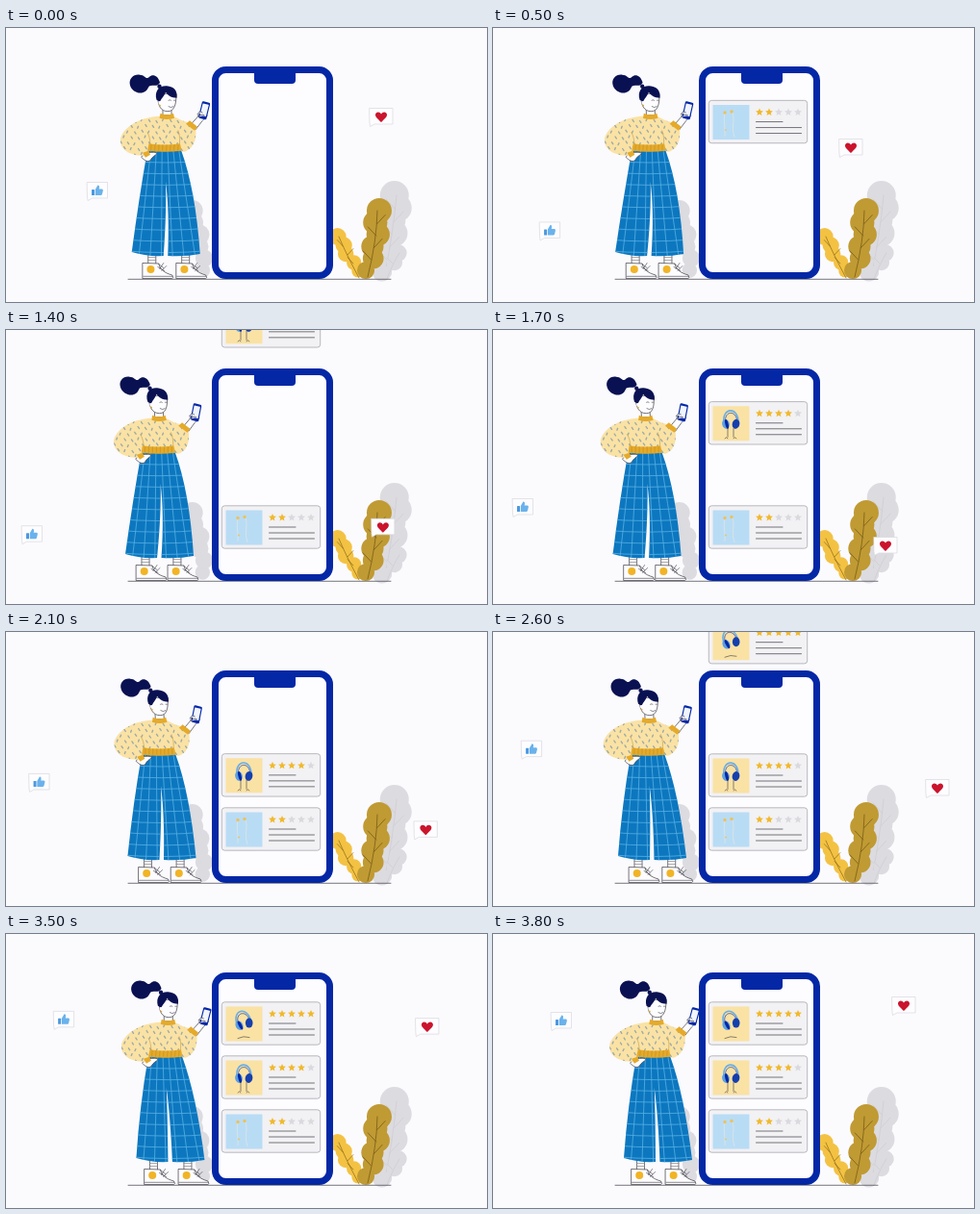
Recreate the animation shown at these times as an HTML page. Size 500 px wide and 285 px high, loop 3900 ms.

```html
<!DOCTYPE html>
<html lang="en">
<head>
<meta charset="utf-8">
<title>Product reviews</title>
<style>
html, body { margin: 0; width: 100%; height: 100%; overflow: hidden; background: #fbfafd; }
svg { display: block; width: 500px; height: 285px; }
</style>
</head>
<body>
<svg id="stage" viewBox="0 0 500 285" xmlns="http://www.w3.org/2000/svg"></svg>
<script>
const LOOP = 3900, STEP = 100;
const NAVY = '#0427a6', HAIR = '#0a1152', INK = '#3c3c44', GOLD = '#e5aa2a', CREAM = '#fae2a4';
const SKIN = '#fdfcff', GRAY = '#dcdbe0', BLUE = '#0c77bf';
const stage = document.getElementById('stage');

const path = (d, fill, stroke = 'none', w = 0.7) =>
  `<path d="${d}" fill="${fill}" stroke="${stroke}" stroke-width="${w}" stroke-linecap="round" stroke-linejoin="round"/>`;
const line = (d, color = INK, w = 0.7) => path(d, 'none', color, w);
const skin = d => path(d, SKIN, INK);
const dot = (x, y, r, fill) => `<circle cx="${x}" cy="${y}" r="${r}" fill="${fill}"/>`;
const rect = (x, y, w, h, r, fill, extra = '') =>
  `<rect x="${x}" y="${y}" width="${w}" height="${h}" rx="${r}" fill="${fill}" ${extra}/>`;
const group = (id, ...parts) => `<g id="${id}">${parts.join('')}</g>`;
const repeat = (n, f) => Array.from({ length: n }, (_, i) => f(i)).join('');
const mix = (a, b, k) => a + (b - a) * k;

// Lobes alternate along a bent stem from base to tip and widen upwards.
function leaf(x0, y0, x1, y1, bend, r, n, fill, vein) {
  const at = k => [mix(x0, x1, k) + bend * Math.sin(Math.PI * k), mix(y0, y1, k)];
  const side = i => (i % 2 ? 1 : -1);
  const lobes = repeat(n, i => {
    const k = i / (n - 1), [x, y] = at(k);
    return dot(x + side(i) * r * 0.15, y, r * (0.7 + 0.3 * Math.sqrt(k)), fill);
  });
  const [mx, my] = at(0.5);
  const stem = `M${x0} ${y0 + 7}Q${mx + bend * 0.5} ${my} ${x1} ${y1}`;
  const ribs = repeat(n - 2, i => {
    const [x, y] = at((i + 0.9) / (n - 1));
    return `M${x} ${y}l${side(i) * r * 0.65} ${-r * 0.7}`;
  });
  return lobes + line(stem + ribs, vein);
}

function star(cx, cy, fill) {
  const pts = repeat(10, i => {
    const r = i % 2 ? 1.9 : 4.1, a = i * Math.PI / 5 - Math.PI / 2;
    return `${(cx + r * Math.cos(a)).toFixed(2)},${(cy + r * Math.sin(a)).toFixed(2)} `;
  });
  return `<polygon points="${pts}" fill="${fill}"/>`;
}

const cup = (x, fill, turn) =>
  `<ellipse cx="${x}" cy="23.5" rx="3.8" ry="5" fill="${fill}" transform="rotate(${turn} ${x} 23.5)"/>`;
const headphones = (tilt, foot) =>
  `<g transform="rotate(${tilt} 23 22)">` + line('M16 22C14 6 31 5 31 22', '#69aee8', 1.6) +
  line('M17.5 20C17 10 28 9 29.5 19', NAVY, 0.6) + cup(18, '#5a9fe2', -14) + cup(28.5, '#153fae', 14) +
  cup(19, NAVY, -14).replace('3.8', '1.6') + '</g>' + line(foot, INK, 0.6);
const earbuds = line('M17 14C15 22 18 30 17 37M25 13C28 22 23 28 27 38', '#dfe6e2', 0.8) +
  dot(17, 13, 1.7, '#ecc25a') + dot(24, 12, 1.7, '#ecc25a') + dot(18, 31, 0.9, '#ecc25a');

const card = (stars, tint, art) => '<g class="card">' +
  rect(0.3, 0.3, 102.4, 44.4, 3, '#f2f1f4', 'stroke="#a9a9af" stroke-width="0.8"') +
  rect(4.5, 5, 38, 36, 0.5, tint) + art +
  repeat(5, i => star(53 + i * 10, 12.6, i < stars ? '#f0b92e' : '#dad9de')) +
  line('M49.5 22.5H77M49.5 28.5H96.5M49.5 34.5H96.5', '#66666c', 0.9) + '</g>';

const bubble = (id, w, icon) => group(id,
  path(`M${-w / 2} -8.5h${w}v16.5h${5 - w}l-4.5 2.5l-.5 -4Z`, '#fdfdff', '#d8d9de', 0.7), icon);
const thumb = rect(-6, -1, 3, 6, 0.5, '#4c98e0') +
  path('M-2.2 -1L0.4 -5.5Q2.4 -5.8 2 -3L1.7 -1.4H4.8Q6.2 -1.2 5.8 0.6L4.9 4.1Q4.6 5 3.5 5H-2.2Z', '#6ab2ec');
const heart = path('M0 6C-3 3 -6.2 0.6 -6 -2C-5.6 -5.2 -1.5 -5.5 0 -2.4C1.5 -5.5 5.6 -5.2 6 -2C6.2 0.6 3 3 0 6Z', '#cb142d');

const shoe = id => group(id,
  skin('M6 -18V1M14 -18V1'), line(repeat(4, i => `M6 ${-12 + i * 3}h8`), '#8a8a90'),
  skin('M0.5 0L17 0.5C18 6 22 10 31 12.5Q33 16 31 16H0.5Z'),
  line('M1 13.8H31M17 1L22 5M22 0L18 6M20 8L25 3M16 4L23 8', INK, 0.6), dot(8.7, 6.5, 4, '#f1b426'));

const blouse = 'M160 94C144 94 123 103 119 117C117.5 130 131 136 147 135L149 129H181L184 131C194 130 199 118 197 106L188 100C183 99 179 96 174 94Z';
const flecks = repeat(7, r => repeat(12, c =>
  `M${119 + c * 7.4 + (r % 2) * 3.7} ${97 + r * 5.8 + (c % 3) * 0.9}l${(r + c) % 3 ? 1.2 : -0.8} 1.9`));

const body = group('body',
  skin('M145 131C150 133 155 130 157 133C155 135 152 136 150 140C147 142 144 140 141 137Z'),
  skin('M190 105L199 95L201 90L208 88L209 94L204 99L197 108Z'),
  skin('M163 82V93H172V85Z'),
  `<clipPath id="topClip"><path d="${blouse}"/></clipPath>`, path(blouse, CREAM),
  `<g clip-path="url(#topClip)">${line(flecks, '#9eaaa8', 1.4)}</g>`,
  line('M150 127C150 119 149 114 147 111M180 126C181 119 181 114 179 109', '#c39b45', 0.6),
  path('M148.5 122.5Q165 125 181 122.5L182.5 130Q165 132 147 130Z', GOLD),
  line(repeat(8, i => `M${151 + i * 4} 124l-.3 5.5`), '#bb841a', 0.5),
  path('M160.5 91Q167 94 174 91L175 96Q167 98.5 159.5 96Z', GOLD),
  path('M187 102L191 98.5L199 105L196 109ZM142 132L148 130L150 134L145 137Z', GOLD),
  skin('M158 71C157 83 161 89 168 89C175 89 177 82 177 71Z'),
  path('M156.5 77C154 68 159 62 167 62.5C175 63 178.5 68 177.5 75C172 75 168 72 166 69C164 74 161 76 160 79Z', HAIR),
  line('M169 77.5Q170.5 76.5 171.5 77.5M174.5 77.5h1.5M169 84Q171.5 86 174 84', INK, 0.6),
  dot(160, 80, 1.6, SKIN), dot(160, 83, 0.9, GOLD),
  path('M160 59C158 51 152 50 149 53C145 57 145 51 139 51C133 50 127 55 129 62C131 69 140 72 145 68C149 65 147 62 152 62C155 62 158 63 160 59Z', HAIR),
  dot(159.5, 63, 2.2, HAIR),
  '<g transform="rotate(14 206 88)">', rect(201.8, 79, 8.6, 18, 1.4, NAVY), rect(202.9, 81.2, 6.4, 12.6, 0.4, '#f1f5fd'), '</g>',
  skin('M199 92Q201 88 204 90M200 95Q203 91 206 93'));

stage.innerHTML = rect(0, 0, 500, 285, 0, '#fbfafd') +
  leaf(206, 252, 192, 190, 2, 11, 6, GRAY, GRAY) +
  leaf(393, 253, 406, 174, 2, 15, 7, GRAY, '#cdccd2') +
  leaf(396, 254, 409, 234, 0, 9, 3, GRAY, '#cdccd2') +
  leaf(367, 253, 346, 217, -2, 9, 5, '#f3c243', '#8b691a') +
  leaf(376, 252, 386, 190, 3, 13, 6, '#c09a33', '#6e5515') +
  line('M127 261.3H400', '#55555d', 0.8) +
  rect(217.5, 43.5, 119, 214, 11, '#fdfcff', `stroke="${NAVY}" stroke-width="7"`) +
  path('M258 43H301V54Q301 58 297 58H262Q258 58 258 54Z', NAVY) +
  shoe('shoeL') + shoe('shoeR') +
  '<clipPath id="legClip"><path id="legShape"/></clipPath>' +
  `<path id="legs" fill="${BLUE}"/>` +
  '<path id="grid" clip-path="url(#legClip)" fill="none" stroke="#58b0e4" stroke-width="0.8"/>' + body +
  card(2, '#b9dcf5', earbuds) +
  card(4, CREAM, headphones(0, 'M20 28V37M26 28V37M17 38.5Q18.5 36 20 38.5M26 38.5Q27.5 36 29 38.5')) +
  card(5, CREAM, headphones(-14, 'M17 38Q23 35 29 37')) +
  bubble('like', 21, thumb) + bubble('love', 24, heart);

const el = {};
stage.querySelectorAll('[id]').forEach(n => { el[n.id] = n; });
const cards = stage.querySelectorAll('.card');
const move = (n, x, y) => n.setAttribute('transform', `translate(${x.toFixed(2)} ${y.toFixed(2)})`);

// Drift paths as [time, x, y] waypoints.
const likePath = [[0, 95, 169], [1000, 30, 237], [1700, 31, 184], [3100, 48, 94], [3800, 71, 90]];
const lovePath = [[0, 390, 92], [500, 372, 124], [1000, 375, 160], [1700, 408, 224], [2600, 462, 162], [3800, 427, 74]];

// Smooth curve through the waypoints on one axis.
function along(keys, t, axis) {
  const n = keys.length - 1;
  const slope = i => {
    const a = keys[Math.max(i - 1, 0)], b = keys[Math.min(i + 1, n)];
    return (b[axis] - a[axis]) / (b[0] - a[0]);
  };
  let i = 0;
  while (i < n - 1 && t >= keys[i + 1][0]) i++;
  const a = keys[i], b = keys[i + 1], h = b[0] - a[0];
  const u = (t - a[0]) / h, v = 1 - u;
  return mix(a[axis], b[axis], u * u * (3 - 2 * u)) + h * u * v * (slope(i) * v - slope(i + 1) * u);
}
const drift = (n, keys, t) => move(n, along(keys, t, 1), along(keys, t, 2));

// Swing from its leftmost value at time t0.
const swing = (t, t0, low, amp, period) => low + amp * (1 - Math.cos(2 * Math.PI * (t - t0) / period));

function drawLegs(d, h) {
  const l = 147 + 0.7 * d, r = 182 + 0.7 * d, c = 167 + 0.6 * d;
  const left = 131 + h, gap = 164 + h, right = 202 + h;
  const shape = `M${l} 127Q${l - 9} 178 ${left} 233Q${left + 16} 238 ${gap} 237Q${c} 190 ${c - 1} 160` +
    `Q${c + 3} 190 ${gap + 4.5} 237Q${right - 15} 238 ${right} 235Q${r + 15} 168 ${r} 127Z`;
  el.legs.setAttribute('d', shape);
  el.legShape.setAttribute('d', shape);
  const cols = repeat(6, i => {
    const k = (i + 0.6) / 6, x0 = mix(l, r, k), x1 = mix(left, right, k);
    return `M${x0} 127Q${mix(x0, x1, 0.45)} 178 ${x1} 240`;
  });
  const rows = repeat(9, i => `M${left - 10} ${138 + i * 11.7}q45 4 90 0`);
  el.grid.setAttribute('d', cols + rows);
}

function draw(t) {
  const d = swing(t, 1650, -9.3, 6.6, 5200), h = swing(t, 1350, -7, 6, 5000);
  const skew = -0.006 * d, foot = Math.min(h, 1.5);
  el.body.setAttribute('transform', `matrix(1 0 ${skew} 1 ${d - 80 * skew} -2.3)`);
  drawLegs(d, h);
  move(el.shoeL, 142 + foot, 244.5);
  move(el.shoeR, 177 + 1.3 * foot, 244.5);
  cards.forEach((n, i) => {
    const u = Math.min(Math.max((t - 200 - 1147 * i) / (937 - 163 * i), 0), 1);
    move(n, 224, mix(-50, 182.5 - 56 * i, 1 - (1 - u) ** 2));
  });
  drift(el.like, likePath, t);
  drift(el.love, lovePath, t);
}

const begin = performance.now();
function tick() {
  const t = (performance.now() - begin) % LOOP;
  draw(Math.floor(t / STEP) * STEP);
  requestAnimationFrame(tick);
}
tick();
</script>
</body>
</html>
```
